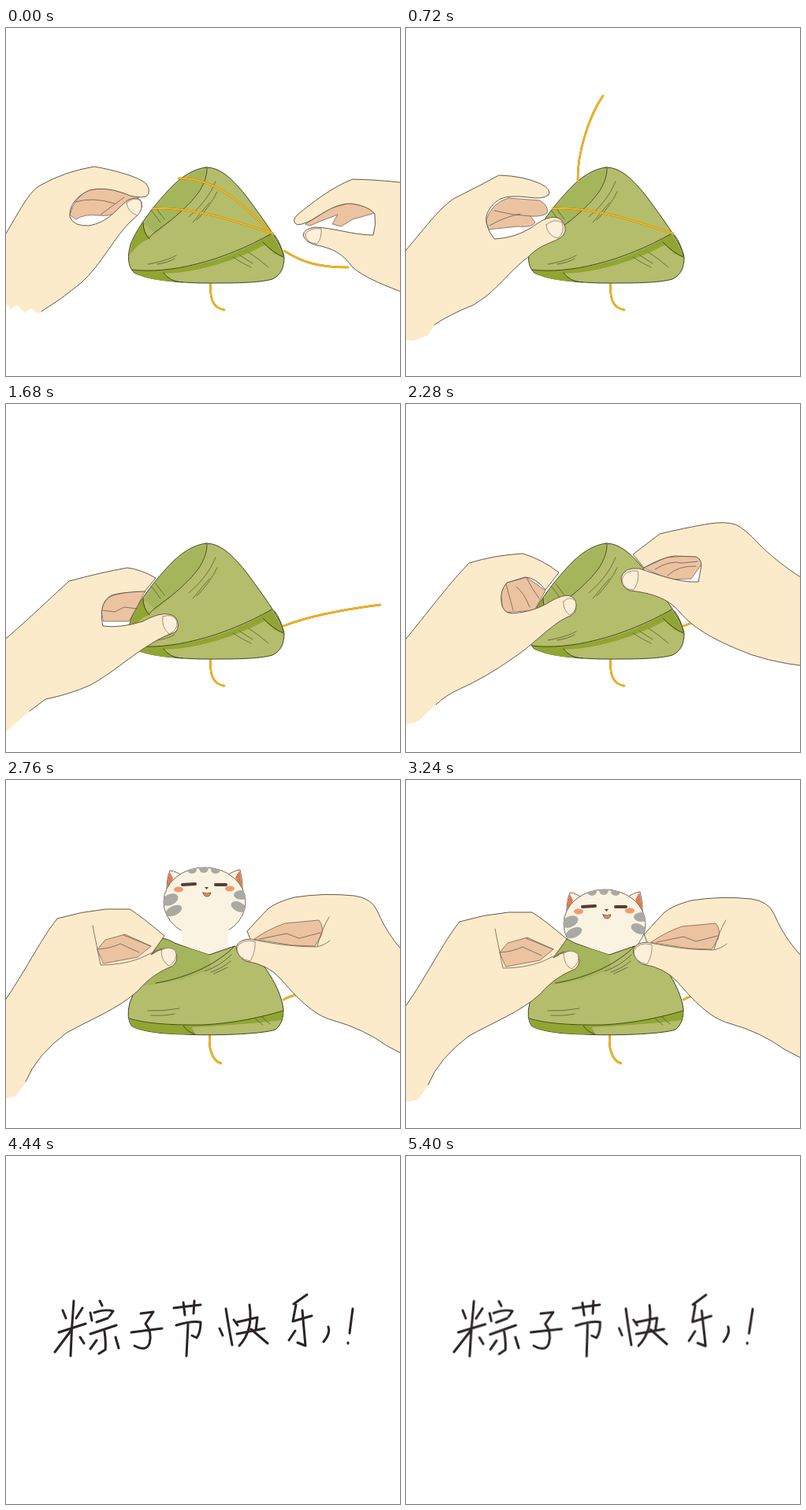
Recreate the animation shown at these times as an HTML page without scripts. Size 500 by 442 pixels, loop 5520 ms.

```html
<!DOCTYPE html>
<html lang="zh">
<head>
<meta charset="utf-8">
<title>Unwrapping</title>
<style>
html, body { margin: 0; width: 100%; height: 100%; overflow: hidden; background: #fff }
svg { display: block; width: 500px; height: 442px }
path { stroke-linecap: round; stroke-linejoin: round }
.t { animation: 5.52s step-end infinite }
.skin { fill: #fcebca; stroke: #66574a; stroke-width: 1 }
.wrist { fill: #fcebca }
.shade { fill: #ebc3a1; stroke: #7d6350; stroke-width: .8 }
.line { fill: none; stroke: #6d5d4e; stroke-width: .8 }
.nail { fill: #fdf0da; stroke: #8d7a68; stroke-width: .8 }
.leaf { fill: #b3bd6c; stroke: #3f421f; stroke-width: 1 }
.side { fill: #a5b55b }
.deep { fill: #91a532 }
.vein { fill: none; stroke: #44491f; stroke-width: 1 }
.thin { fill: none; stroke: #59602c; stroke-width: .8 }
.rope { fill: none; stroke: #f2b41b; stroke-width: 2.4; filter: drop-shadow(.7px .8px 0 #6b4c10) }
.ink path {
  fill: none; stroke: #2b2427; stroke-width: 3;
  transform-box: fill-box; transform-origin: center;
  animation: boil 5.52s step-end infinite;
}
.ink path:nth-child(even) { --turn: -1 }

/* one frame is 120 ms, 2.174% of the loop */
@keyframes act1 { 0% { visibility: visible } 45.65% { visibility: hidden } }
@keyframes act2 { 0% { visibility: hidden } 45.65% { visibility: visible } 78.26% { visibility: hidden } }
@keyframes act3 { 0% { visibility: hidden } 78.26% { visibility: visible } }
@keyframes strand1 { 0% { visibility: visible } 10.86% { visibility: hidden } }
@keyframes strand2 { 0% { visibility: visible } 26.08% { visibility: hidden } }
@keyframes rope {
  0% { d: path("M353,283C375,297 395,304 434,304") }
  4.34% { d: path("M353,283C370,288 386,276 392,250") }
  6.52% { d: path("M340,261C358,255 378,235 388,212") }
  8.69% { d: path("M340,261C370,245 400,205 405,160") }
  10.86% { d: path("M218,192C245,130 320,95 450,128") }
  13.04% { d: path("M218,194C217,160 232,112 250,86") }
  15.21% { d: path("M218,194C214,165 222,125 228,98") }
  17.39% { d: path("M218,194C212,185 204,172 203,158") }
  19.56% { d: path("M340,261C352,240 380,205 408,190") }
  21.73% { d: path("M340,261C365,240 385,215 400,180") }
  23.91% { d: path("M340,261C370,230 400,170 405,110") }
  26.08% { d: path("M187,228C185,190 215,120 240,84") }
  28.26% { d: path("M352,282C380,262 420,225 470,205") }
  30.43%, 100% { d: path("M352,282C380,271 420,262 475,255") }
}
@keyframes left0 { 0% { visibility: visible } 2.17% { transform: translate(4px,3px) } 4.34% { transform: translate(10px,9px) } 6.52% { visibility: hidden } }
@keyframes right0 {
  0% { transform: none; visibility: visible }
  2.17% { transform: translate(-6px,8px) }
  4.34% { transform: translate(8px,0) }
  6.52% { transform: translate(14px,-38px) }
  8.69% { transform: translate(34px,-88px) }
  10.86% { transform: translate(82px,-120px); visibility: visible }
  13.04%, 100% { transform: translate(82px,-120px); visibility: hidden }
}
@keyframes left1 {
  0% { visibility: hidden }
  6.52% { visibility: visible; transform: translate(-8px,-3px) }
  8.69% { transform: translate(-3px,-1px) }
  10.86%, 17.39% { transform: none }
  15.21% { transform: translate(1px,1px) }
  19.56% { transform: translate(2px,4px) }
  23.91% { transform: translate(4px,6px); visibility: visible }
  26.08%, 100% { visibility: hidden }
}
@keyframes left2 {
  0% { visibility: hidden }
  26.08% { visibility: visible; transform: translate(-3px,-2px) }
  28.26%, 32.6% { transform: translate(-1px,0) }
  30.43%, 34.78% { transform: none }
  36.95% { transform: translate(-1px,-5px); visibility: visible }
  39.13%, 100% { visibility: hidden }
}
@keyframes left3 {
  0% { visibility: hidden }
  39.13% { visibility: visible; transform: translate(0,4px) }
  41.3% { transform: none }
  43.47% { transform: translate(-1px,-2px); visibility: visible }
  45.65%, 100% { visibility: hidden }
}
@keyframes right3 {
  0% { visibility: hidden }
  34.78% { visibility: visible; transform: translate(150px,20px) }
  36.95% { transform: translate(75px,10px) }
  39.13% { transform: translate(20px,3px) }
  41.3% { transform: none }
  43.47% { transform: translate(1px,-3px); visibility: visible }
  45.65%, 100% { visibility: hidden }
}
@keyframes left4 {
  0% { transform: translate(4px,14px) }
  47.82% { transform: translate(3px,9px) }
  50% { transform: translate(-3px,-4px) }
  52.17% { transform: translate(-2px,-2px) }
  54.34%, 58.69%, 67.39%, 76.08% { transform: none }
  56.52%, 65.21%, 73.91% { transform: translate(1px,1px) }
  60.86%, 69.56% { transform: translate(-1px,-2px) }
  63.04%, 71.73% { transform: translate(0,-1px) }
}
@keyframes right4 {
  0% { transform: translate(-8px,8px) }
  47.82% { transform: translate(-5px,5px) }
  50% { transform: translate(4px,-4px) }
  52.17% { transform: translate(2px,-2px) }
  54.34%, 58.69%, 67.39%, 76.08% { transform: none }
  56.52%, 65.21%, 73.91% { transform: translate(-1px,1px) }
  60.86%, 69.56% { transform: translate(1px,-2px) }
  63.04%, 71.73% { transform: translate(0,-1px) }
}
@keyframes cat {
  0% { transform: translate(0,62px) }
  47.82% { transform: translate(0,25px) }
  50% { transform: translate(0,-28px) }
  52.17% { transform: translate(0,-14px) }
  54.34%, 58.69%, 67.39%, 76.08% { transform: none }
  56.52%, 65.21%, 73.91% { transform: translate(0,2px) }
  60.86%, 69.56% { transform: translate(0,-4px) }
  63.04%, 71.73% { transform: translate(0,-2px) }
}
@keyframes boil {
  0%, 80.43%, 86.95%, 93.47% { transform: none }
  78.26%, 84.78%, 91.3%, 97.82% { transform: translate(-.5px,.3px) rotate(calc(var(--turn, 1) * 1.2deg)) }
  82.6%, 89.13%, 95.65% { transform: translate(.4px,-.4px) rotate(calc(var(--turn, 1) * -1.2deg)) }
}
</style>
</head>
<body>
<svg viewBox="0 0 500 442">
<defs>
  <clipPath id="head"><ellipse cx="252" cy="183" rx="52" ry="44"/></clipPath>
</defs>

<!-- wrapped dumpling -->
<g class="t" style="animation-name:act1">
  <path class="rope" d="M260,323C258,343 262,356 277,358"/>
  <path class="leaf" d="M254,177C237,179 222,190 211,201C192,220 166,253 158,275C154,289 154,303 163,311C176,318 205,323 250,324C290,324 320,324 338,319C349,314 353,304 353,291C350,275 328,245 306,215C287,191 272,177 254,177Z"/>
  <path class="side" d="M253,179C237,181 222,192 211,203C195,219 180,237 175,248L190,262L222,232Q254,202 253,179Z"/>
  <path class="deep" d="M174,247C165,260 158,273 157,288Q168,273 183,267Q175,260 174,247ZM160,307C220,312 285,295 337,261L341,268C318,283 260,310 200,312Q210,322 222,322C190,322 166,316 160,307ZM335,262Q346,272 352,291L341,287L326,273Z"/>
  <path class="vein" d="M255,178C255,202 236,220 221,234C205,249 190,257 182,266M160,307C205,313 275,297 337,261M174,247Q174,260 182,268M200,311Q207,322 224,323M326,272Q338,285 352,291M341,263Q349,274 352,289"/>
  <path class="thin" d="M266,195Q256,220 232,240M268,208Q258,228 242,244M258,222L237,247M180,300Q200,297 216,289M192,300Q205,298 214,293M184,231L196,247M190,228L201,243M288,291Q300,299 311,304M297,289L313,299M308,285Q322,294 333,304"/>
</g>

<!-- opened dumpling with the cat -->
<g class="t" style="animation-name:act2">
  <path class="rope" d="M259,323C256,340 262,357 273,360"/>
  <g class="t" style="animation-name:cat">
    <path d="M204,174Q203,155 208,143Q217,144 226,151ZM279,150Q289,143 297,142Q301,157 300,174Z" fill="#fbf3e2" stroke="#6f5a4a" stroke-width=".9"/>
    <path d="M205,169Q204,155 208,145L212,153ZM291,152L296,143Q300,155 299,169Z" fill="#dc7c55"/>
    <ellipse cx="252" cy="183" rx="52" ry="44" fill="#fbf3e2" stroke="#6f5a4a" stroke-width=".9"/>
    <path d="M222,215H283L280,255H226Z" fill="#fbf3e2"/>
    <g fill="#a9aaa4" clip-path="url(#head)">
      <ellipse cx="236" cy="142" rx="6" ry="5"/><ellipse cx="251" cy="140" rx="6" ry="6"/><ellipse cx="266" cy="142" rx="6" ry="5"/>
      <ellipse cx="208" cy="180" rx="11" ry="7" transform="rotate(-25 208 180)"/><ellipse cx="213" cy="194" rx="11" ry="6" transform="rotate(-25 213 194)"/>
      <ellipse cx="299" cy="174" rx="10" ry="6"/><ellipse cx="295" cy="189" rx="10" ry="6" transform="rotate(25 295 189)"/>
    </g>
    <path d="M224,161L240,160M266,161L279,161" stroke="#583c33" stroke-width="4"/>
    <ellipse cx="219" cy="167" rx="6" ry="3.5" fill="#f09a72"/><ellipse cx="284" cy="166" rx="6" ry="3.5" fill="#f09a72"/>
    <path d="M252,164H257L254.500,167Z" fill="#584038"/>
    <path d="M250,171Q255,173 260,171Q259,176 255,176Q251,176 250,171Z" fill="#e98b63" stroke="#6b4538" stroke-width=".8"/>
  </g>
  <path class="leaf" d="M198,201Q205,201 214,207Q235,215 258,222L290,211Q315,222 330,240C342,258 350,275 352,291Q353,308 342,317C325,323 260,325 225,323Q178,322 160,313Q152,303 157,283C168,255 185,220 198,201Z"/>
  <path class="side" d="M198,202Q205,202 214,208L258,222L260,239C235,252 212,256 190,259L171,262C178,240 190,215 198,202Z"/>
  <path class="deep" d="M157,304Q190,313 250,311C290,309 320,302 352,293L350,305Q300,311 236,314L240,323Q180,323 160,313Z"/>
  <path class="vein" d="M290,211C270,232 235,250 190,258M157,303Q185,312 250,311C290,309 325,301 352,293M225,312Q230,320 240,323"/>
  <path class="thin" d="M286,222Q272,236 252,243M285,230Q275,239 260,244M281,238L264,246M180,293Q200,294 220,290M184,299Q200,300 214,297M317,304L326,311M325,301L335,310"/>
</g>

<!-- string -->
<g class="t" style="animation-name:act1">
  <path class="rope t" style="animation-name:strand1" d="M219,191C245,190 268,201 287,215C307,230 322,246 338,261"/>
  <path class="rope t" style="animation-name:strand2" d="M186,229C235,227 280,242 339,261"/>
  <path class="rope t" style="animation-name:rope" d="M353,283C375,297 395,304 434,304"/>
</g>
<path class="rope t" style="animation-name:act2" d="M352,279Q362,273 376,272"/>

<!-- hands -->
<g class="t" style="animation-name:left0">
  <path class="shade" d="M81,237Q86,216 106,205L135,203L170,214L148,232Q130,240 118,238Q98,236 89,243Z"/>
  <path class="line" d="M88,221Q110,214 138,223M120,237L150,215"/>
  <path class="wrist" d="M-30,300L0,264L60,250L48,359L41,363L32,356L24,362L14,352L6,357L0,350L-30,345Z"/>
  <path class="skin" d="M-30,305C5,262 22,212 43,200Q75,182 112,176C140,181 168,189 178,198Q185,208 178,214Q165,217 150,210Q125,201 106,206C90,213 80,225 81,240Q86,252 105,251C130,247 140,230 154,219Q168,212 172,221Q175,233 160,244C138,264 122,300 95,324Q70,345 45,360"/>
  <path class="nail" d="M153,222Q164,213 171,220Q174,230 167,238Q155,235 153,222Z"/>
</g>
<g class="t" style="animation-name:right0">
  <path class="shade" d="M380,249L412,229L436,222Q458,224 468,235L440,243L425,252L414,249L421,237L400,245L386,251Z"/>
  <path class="skin" d="M530,200Q485,193 440,192C412,203 390,221 370,237Q361,246 370,250Q381,249 394,240C410,230 422,223 438,223Q460,226 468,236Q470,250 466,263C440,263 418,254 392,253Q378,255 377,263Q380,273 395,276C418,281 428,288 440,304Q458,321 530,345"/>
  <path class="nail" d="M380,262Q385,253 400,255Q401,266 395,274Q380,273 380,262Z"/>
</g>
<g class="t" style="animation-name:left1">
  <path class="shade" d="M102,243Q109,222 130,216L170,219Q182,227 179,235Q173,240 158,239L164,247Q160,254 142,252L104,256Z"/>
  <path class="line" d="M112,232Q135,238 158,239M106,251Q125,240 145,236"/>
  <path class="wrist" d="M-30,315L0,284L80,270L36,378L28,390L10,397L-30,396Z"/>
  <path class="skin" d="M-30,315C10,275 38,230 62,216Q92,201 118,187Q150,188 171,198Q185,205 181,212Q173,218 155,215Q132,212 120,217C107,224 100,237 102,247Q104,258 112,268Q138,267 160,253C172,244 186,236 196,243Q206,253 200,263C190,273 172,273 156,290C130,309 115,335 85,352Q55,364 36,377"/>
  <path class="nail" d="M178,250Q188,241 198,247Q202,259 193,267Q179,264 178,250Z"/>
</g>
<g class="t" style="animation-name:left2">
  <path class="shade" d="M121,262Q124,248 136,243L154,239L177,237L165,260L156,276H124Z"/>
  <path class="line" d="M122,262L138,264L150,258L166,260"/>
  <path class="wrist" d="M-30,325L0,297L90,290L50,375L30,390L0,416L-30,430Z"/>
  <path class="skin" d="M-30,322C10,292 50,252 80,225Q120,214 154,208Q171,210 190,221L176,238Q145,239 134,243C122,249 119,264 123,282Q145,285 174,276C190,267 206,263 215,271Q222,281 215,290Q204,293 190,301C160,318 135,342 107,357Q80,369 50,375L30,390"/>
  <path class="nail" d="M199,270Q212,265 217,276Q218,288 207,292Q197,284 199,270Z"/>
</g>
<g class="t" style="animation-name:left3">
  <path class="shade" d="M120,236L128,227L153,220L177,237L163,262L124,265Z"/>
  <path class="line" d="M127,229L136,262M140,232Q150,240 157,258M153,221Q160,235 169,247"/>
  <path class="wrist" d="M-30,330L0,299L90,280L40,380L15,403L0,407L-30,415Z"/>
  <path class="skin" d="M-30,333C5,296 45,238 80,202Q112,192 148,190Q172,197 194,214L177,236Q164,220 151,220L128,227Q119,237 121,252Q123,266 135,266Q160,264 178,254C194,244 209,238 215,250Q219,263 209,269C188,276 165,303 137,322Q100,348 68,362Q50,370 38,382"/>
  <path class="nail" d="M200,251Q207,243 215,250Q218,262 208,268Q199,262 200,251Z"/>
</g>
<g class="t" style="animation-name:right3">
  <path class="shade" d="M302,208L330,195L368,192L376,202L362,222L335,223Z"/>
  <path class="line" d="M316,210Q335,198 350,202L370,200M332,218Q345,205 368,206"/>
  <path class="skin" d="M530,238C490,215 465,195 448,178Q430,158 418,153Q405,149 385,152Q350,158 322,165L288,191L302,208Q325,195 340,193L368,194Q377,198 374,210L371,226C345,227 318,216 296,209Q277,207 273,220Q273,233 284,237C310,240 332,246 347,264C367,287 395,302 440,319Q480,332 530,335"/>
  <path class="nail" d="M274,223Q278,210 294,212Q297,224 289,236Q275,236 274,223Z"/>
</g>
<g class="t" style="animation-name:act2">
  <g class="t" style="animation-name:left4">
    <path class="wrist" d="M-30,325L0,289L90,270L28,388L15,406L0,409L-30,415Z"/>
    <path class="skin" d="M-30,325C15,275 40,215 68,180Q98,171 130,168L160,168Q176,178 204,202L187,226Q205,214 215,219Q225,230 215,240C198,247 185,255 170,272C145,295 110,308 80,325Q42,353 28,387"/>
    <path class="shade" d="M119,219L129,207L154,200L187,215L170,229L127,237Z"/>
    <path class="line" d="M113,189Q118,214 123,239Q150,239 172,231L200,218M120,219Q135,218 148,212L172,223M152,201L187,215"/>
    <path class="nail" d="M200,220Q210,214 218,221Q222,232 210,240Q200,235 200,220Z"/>
  </g>
  <g class="t" style="animation-name:right4">
    <path class="skin" d="M530,250C493,220 478,195 467,170Q460,154 438,151Q400,147 362,153Q339,159 328,168L302,196L306,206Q292,206 288,216Q289,228 300,234Q328,238 344,256C365,280 385,302 410,309Q450,320 480,342L530,368"/>
    <path class="shade" d="M311,206Q330,193 350,186L393,182Q400,190 396,202L388,215L360,214Z"/>
    <path class="line" d="M306,206Q350,216 390,216Q400,214 407,208M406,178Q396,195 391,215M318,206L352,199L368,205L395,198"/>
    <path class="nail" d="M289,217Q295,205 312,209Q313,222 306,234Q289,231 289,217Z"/>
  </g>
</g>

<!-- handwritten greeting -->
<g class="ink t" style="animation-name:act3" role="img" aria-label="粽子节快乐!">
  <path d="M86,184Q83,220 82,254M72,196L76,206M97,193L89,206M67,224L101,213M83,221L62,249M94,230L99,238"/>
  <path d="M119,184L122,190M107,199L109,209M112,199Q126,194 136,197L131,204M115,211L129,206M107,226L140,215M125,223Q127,236 126,246L118,251M115,234L107,245M139,230L143,244"/>
  <path d="M171,200L187,198L177,213Q186,224 182,238Q178,249 163,241M159,224L198,219"/>
  <path d="M213,193L247,189M225,186L227,202M239,184L238,200M216,215Q236,209 247,211Q247,224 242,231L236,228M231,214L229,254"/>
  <path d="M279,194Q283,220 287,240M271,219L275,228M289,208L294,215M293,211L319,205L317,221M293,226L328,219M309,189Q314,222 296,241M311,220L332,238"/>
  <path d="M382,176L365,188M368,189L364,210L388,203M376,196L380,241L370,237M367,222L359,234M409,217Q412,225 403,236"/>
  <path d="M440,194L436,225M434,237V238"/>
</g>
</svg>
</body>
</html>
```
